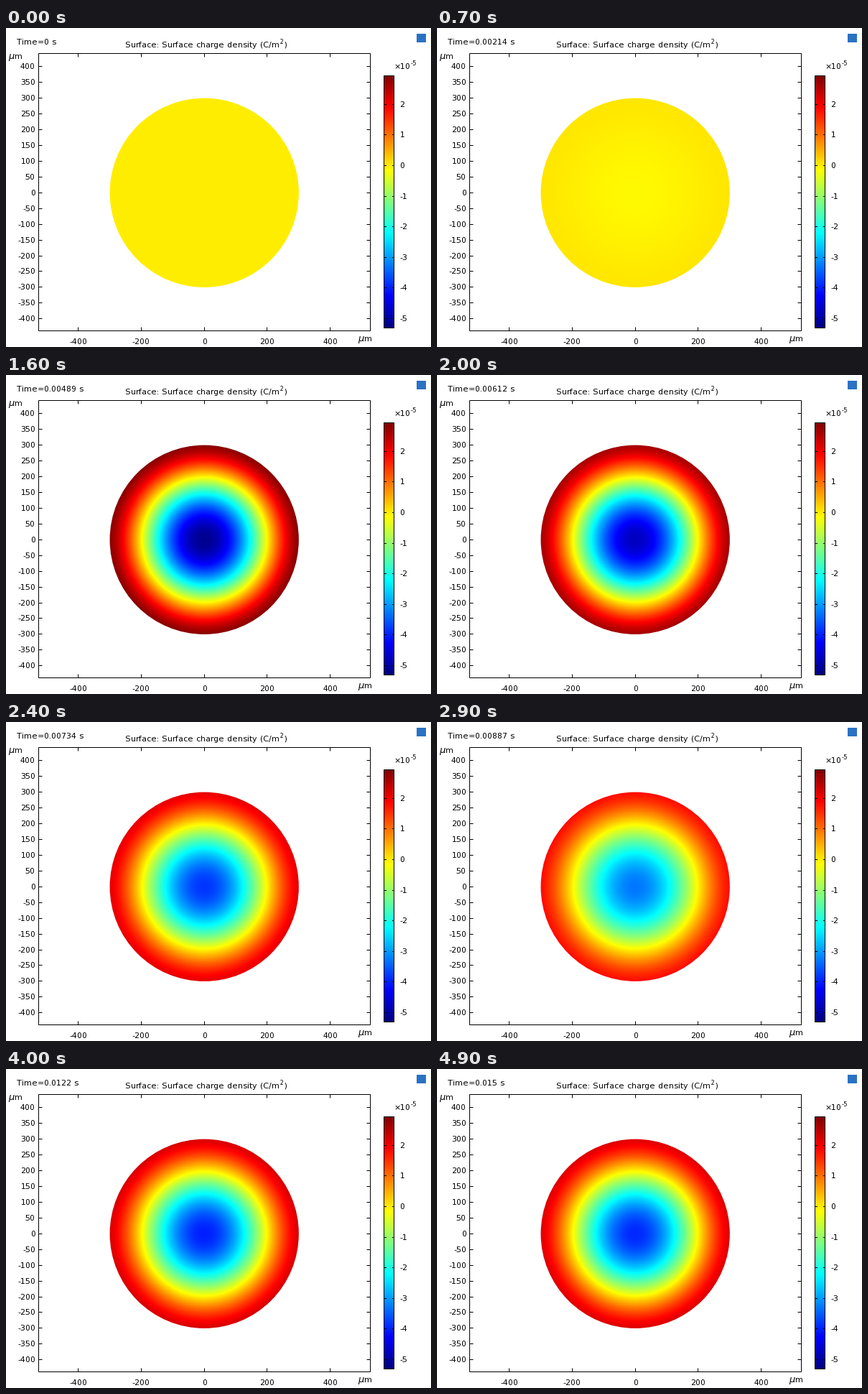
Recreate the animation shown at these times as a matplotlib script. Size 592 px wide and 444 px high, loop 5 s.

```python
import math

import matplotlib.pyplot as plt
import numpy as np
from matplotlib.animation import FuncAnimation
from matplotlib.colors import LinearSegmentedColormap
from matplotlib.patches import Circle, Rectangle

W, H, DPI = 592, 444, 72
FRAMES, INTERVAL = 50, 100
END_TIME = 0.015
CX, CY, SCALE = 276.2, 229.25, 0.4388     # plot centre, pixels per micrometre
LEFT, RIGHT, TOP, BOTTOM = 45.5, 507.5, 35.5, 421.5
BAR_L, BAR_R, BAR_T, BAR_B = 527, 541, 66, 417
BAR_ZERO, BAR_UNIT = 191.5, 42.6
VMIN, VMAX = -5.29, 2.95

# Whole-pixel glyph advances
plt.rcParams.update({"font.family": "DejaVu Sans", "text.hinting_factor": 1})
fig = plt.figure(figsize=(W / DPI, H / DPI), dpi=DPI, facecolor="white")
ax = fig.add_axes([0, 0, 1, 1])
ax.axis("off")

rainbow = LinearSegmentedColormap.from_list("rainbow", [
    (0, (0, 0, 0.5)), (0.125, (0, 0, 1)), (0.375, (0, 1, 1)),
    (0.625, (1, 1, 0)), (0.875, (1, 0, 0)), (1, (0.5, 0, 0))], N=1024)


def label(x, y, text, size=11, **kw):
    return ax.text(x, y, text, fontsize=size, color="black", va="baseline", **kw)


def append(previous, y, text, size=11):
    """Continue a label to the right, on its own baseline."""
    return ax.annotate(text, (1, y), xycoords=(previous, "data"), xytext=(1, 0),
                       textcoords="offset points", fontsize=size, va="baseline")


def line(x0, y0, x1, y1):
    ax.plot([x0, x1], [y0, y1], color="black", lw=1, solid_capstyle="butt",
            snap=False)


def frame_box(x0, y0, x1, y1):
    ax.add_patch(Rectangle((x0, y0), x1 - x0, y1 - y0, fill=False,
                           ec="black", lw=1, zorder=3, snap=False))


def color_image(data, extent):
    return ax.imshow(data, cmap=rainbow, vmin=VMIN, vmax=VMAX, extent=extent,
                     aspect="auto", interpolation="nearest")


# Radial charge profile, -1 at the centre
px, py = np.meshgrid(np.arange(144, 410) + 0.5, np.arange(96, 363) + 0.5)
r2 = ((px - CX) ** 2 + (py - CY) ** 2) / (300 * SCALE) ** 2
profile = -1 + 2.75 * r2 - 1.193 * r2 ** 2

disc = color_image(np.zeros_like(profile), (144, 410, 363, 96))
disc.set_clip_path(Circle((CX, CY), 300 * SCALE, transform=ax.transData))

bar_rows = np.linspace(VMAX, VMIN, BAR_B - BAR_T)[:, None]
color_image(bar_rows, (BAR_L, BAR_R, BAR_B, BAR_T))
frame_box(BAR_L - 0.5, BAR_T + 0.5, BAR_R - 0.5, BAR_B + 0.5)
frame_box(LEFT, TOP, RIGHT, BOTTOM)

for v in range(-400, 401, 50):
    row = math.floor(CY - v * SCALE)
    line(LEFT, row + 0.5, LEFT + 5, row + 0.5)
    line(RIGHT - 5, row + 0.5, RIGHT, row + 0.5)
    label(41, row + 4, str(v), ha="right")

for v in range(-400, 401, 200):
    x = CX + v * SCALE
    column = math.floor(x) + 0.5
    line(column, TOP, column, TOP + 5)
    line(column, BOTTOM - 5, column, BOTTOM)
    label(x, 440, str(v), ha="center")

for v in range(-5, 3):
    row = math.floor(BAR_ZERO - v * BAR_UNIT)
    line(BAR_L, row + 0.5, BAR_L + 3, row + 0.5)
    line(BAR_R - 3, row + 0.5, BAR_R, row + 0.5)
    label(548, row + 4, str(v))

for x, y in ((3, 43), (490, 436)):
    label(x, y, "μ", size=12.5, style="italic")
    label(x + 8, y, "m")

title = label(166, 27, "Surface: Surface charge density (C/m")
square = append(title, 22, "2", size=8)
append(square, 27, ")")
power = label(540, 57, "×10")
append(power, 52, "-5", size=8)
ax.add_patch(Rectangle((571.5, 7.5), 13, 12, color="#2a72c4", lw=0))
time_label = label(15, 23, "Time=0 s")

ax.set_xlim(0, W)
ax.set_ylim(H, 0)


def time_text(t):
    """Three significant digits, cut rather than rounded."""
    if 0 < t < 0.001:
        return f"{math.floor(t * 1e6 + 1e-6) / 100:g}E-4"
    digits = 1e5 if t < 0.01 else 1e4
    return f"{math.floor(t * digits + 1e-6) / digits:g}"


def amplitude(n):
    """Driven rise to a first peak, then a damped swing about the rest level."""
    peak, onset, rest, top = 17, 4.5, 3.87, 5.3
    if n < peak:
        u = max(0, (n - onset) / (peak - onset))
        return top * ((1 - math.cos(math.pi * u)) / 2) ** 1.7
    s = n - peak
    return rest + (top - rest) * math.exp(-0.07 * s) * math.cos(0.23 * s)


def update(n):
    disc.set_data(amplitude(n) * profile)
    time_label.set_text(f"Time={time_text(END_TIME * n / (FRAMES - 1))} s")
    return disc, time_label


anim = FuncAnimation(fig, update, frames=FRAMES, interval=INTERVAL,
                     repeat=True, repeat_delay=0, blit=False)
plt.show()
```
